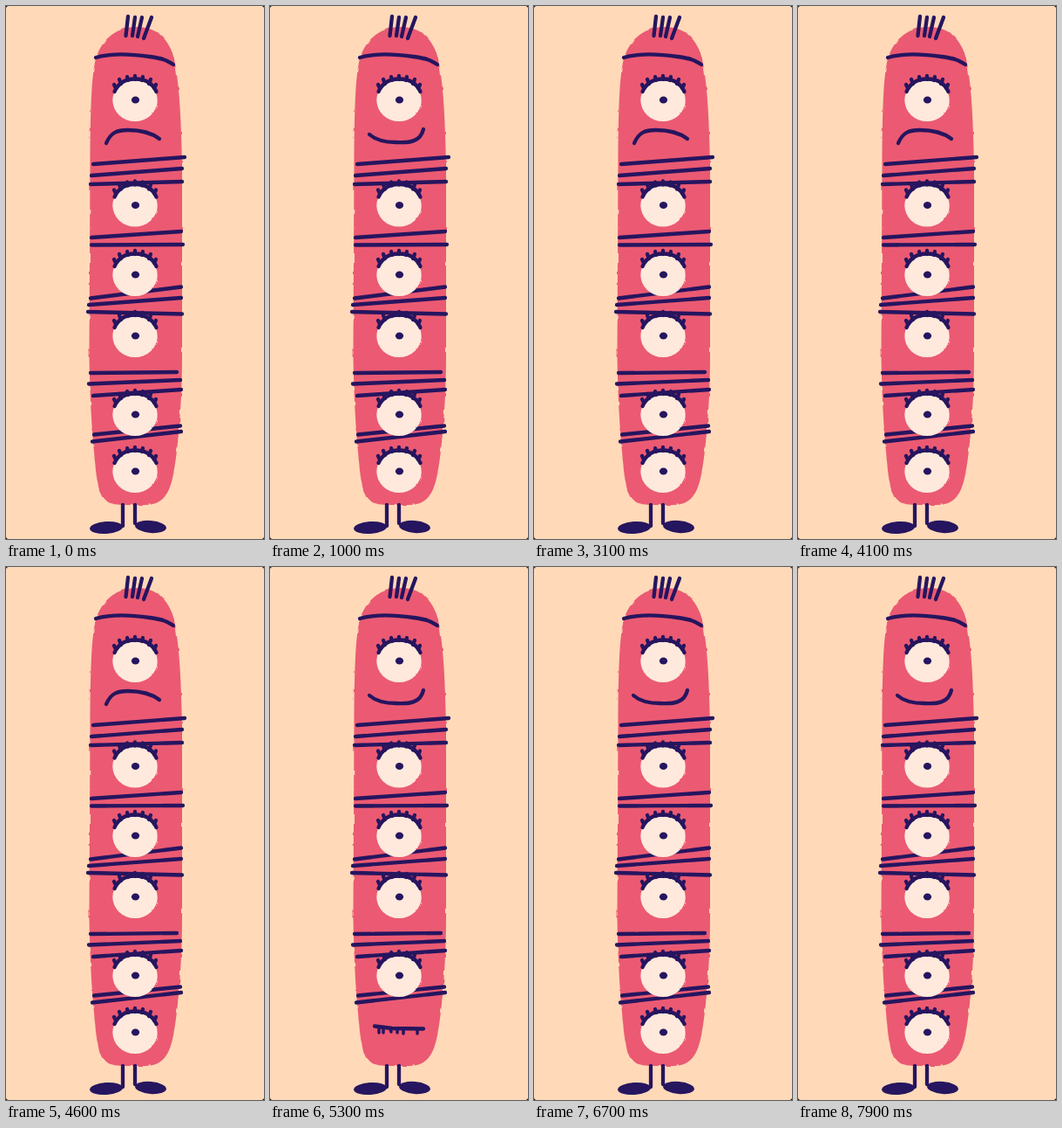
Animation, 296 px wide and 610 px high, one loop 8000 ms. Source, as an HTML page:

```html
<!DOCTYPE html>
<html>
<head>
<meta charset="utf-8">
<style>
  html, body { margin: 0; width: 100%; height: 100%; overflow: hidden; background: #000; }
  svg { display: block; width: 296px; height: 610px; background: #ffd9b8; border-radius: 3px; }
  .ink { fill: none; stroke: #26155f; stroke-width: 4.3; stroke-linecap: round; stroke-linejoin: round; }
  .solid { fill: #26155f; }
  .white { fill: #ffe9dc; }
</style>
</head>
<body>
<svg viewBox="0 0 296 610">
  <defs>
    <filter id="rough" x="-10%" y="-10%" width="120%" height="120%" color-interpolation-filters="sRGB">
      <feTurbulence type="fractalNoise" baseFrequency="0.1" numOctaves="1" seed="4"/>
      <feDisplacementMap in="SourceGraphic" scale="3" xChannelSelector="R" yChannelSelector="G"/>
    </filter>
    <g id="open">
      <ellipse class="white" cx="148" cy=".7" rx="25.7" ry="24.3" filter="url(#rough)"/>
      <path class="ink" d="M124.500-9C129-19 137-23.500 148-23.500S168-19 172.500-9"/>
      <path class="ink" d="M126-13L124-17M132-18L130-23M140-22L139-26M148-23V-27M156-22L157-26M164-18L166-23M170-13L172-17"/>
      <ellipse class="solid" cx="148.500" cy=".5" rx="4.600" ry="4"/>
    </g>
    <g id="closed" class="ink">
      <path d="M120-6.500L140-4L176-3.500"/>
      <path stroke-width="3.500" d="M125-5V1M130-5V1M138-4L139 0M146-3V1M153-3V2M169-3V2"/>
    </g>
  </defs>

  <path filter="url(#rough)" fill="#eb5a72" d="M150 24C128 24 111 36 103 60C97 85 97 130 96.500 180L95.500 400C96 440 98 480 101 510C103 535 105 550 109 559C113 569 122 571 140 571H160C178 571 188 560 192 535C198 505 202 450 202 400V180C201 130 199 90 193 60C186 36 172 24 150 24Z"/>

  <g class="ink">
    <path d="M140 12L137.500 34M148 13L145 34M156 13L151 35M167 13L158 37"/>
    <path d="M103 59C120 54 145 55 165 58S185 63 192 67"/>
    <path d="M100 181L205 173M98 194L202 186M97 204L202 201"/>
    <path d="M98 265L201 258M98 273.500L203 273"/>
    <path d="M97 334.500L201 321.500M95 342L201 334M94 350L202 352.500"/>
    <path d="M97 420L196 419M95 432.500L200 428M100 446L201 439"/>
    <path d="M101 490.500L200 480.500M99 498.500L201 487"/>
    <path d="M134 571V595M148 571V592"/>
    <path id="mouth"/>
  </g>
  <ellipse class="solid" cx="115" cy="597" rx="19" ry="7" transform="rotate(-4 115 597)"/>
  <ellipse class="solid" cx="166" cy="596" rx="18" ry="7" transform="rotate(5 166 596)"/>
  <g id="eyes"></g>
</svg>
<script>
  const LOOP = 8000;
  const SAD = 'M115 157C120 145 127 142 140 142C155 142 168 146 176 152';
  const SMILE = 'M114 147C122 154 133 156 145 156C160 157 173 155 176 141';
  const smiles = [[1000, 2600], [5300, 8000]];

  // Each eye: vertical centre and the spans during which it is shut.
  const eyes = [
    { y: 107, shut: [[1700, 2100]] },
    { y: 227.5, shut: [[500, 1000], [3600, 3900]] },
    { y: 307, shut: [[2600, 3100], [6200, 6400]] },
    { y: 377, shut: [[1300, 1600]] },
    { y: 467, shut: [[1900, 2200], [5700, 5900], [6900, 7200]] },
    { y: 532, shut: [[5200, 5600]] },
  ];

  const mouth = document.getElementById('mouth');
  for (const eye of eyes) {
    eye.node = document.createElementNS('http://www.w3.org/2000/svg', 'use');
    eye.node.setAttribute('transform', `translate(0 ${eye.y})`);
    document.getElementById('eyes').append(eye.node);
  }

  const within = (t, spans) => spans.some(([from, to]) => t >= from && t < to);

  function set(node, name, value) {
    if (node.getAttribute(name) !== value) node.setAttribute(name, value);
  }

  function draw(now) {
    const t = now % LOOP;
    set(mouth, 'd', within(t, smiles) ? SMILE : SAD);
    for (const eye of eyes) set(eye.node, 'href', within(t, eye.shut) ? '#closed' : '#open');
  }

  const start = performance.now();
  function tick() {
    draw(performance.now() - start);
    requestAnimationFrame(tick);
  }
  tick();
</script>
</body>
</html>
```
